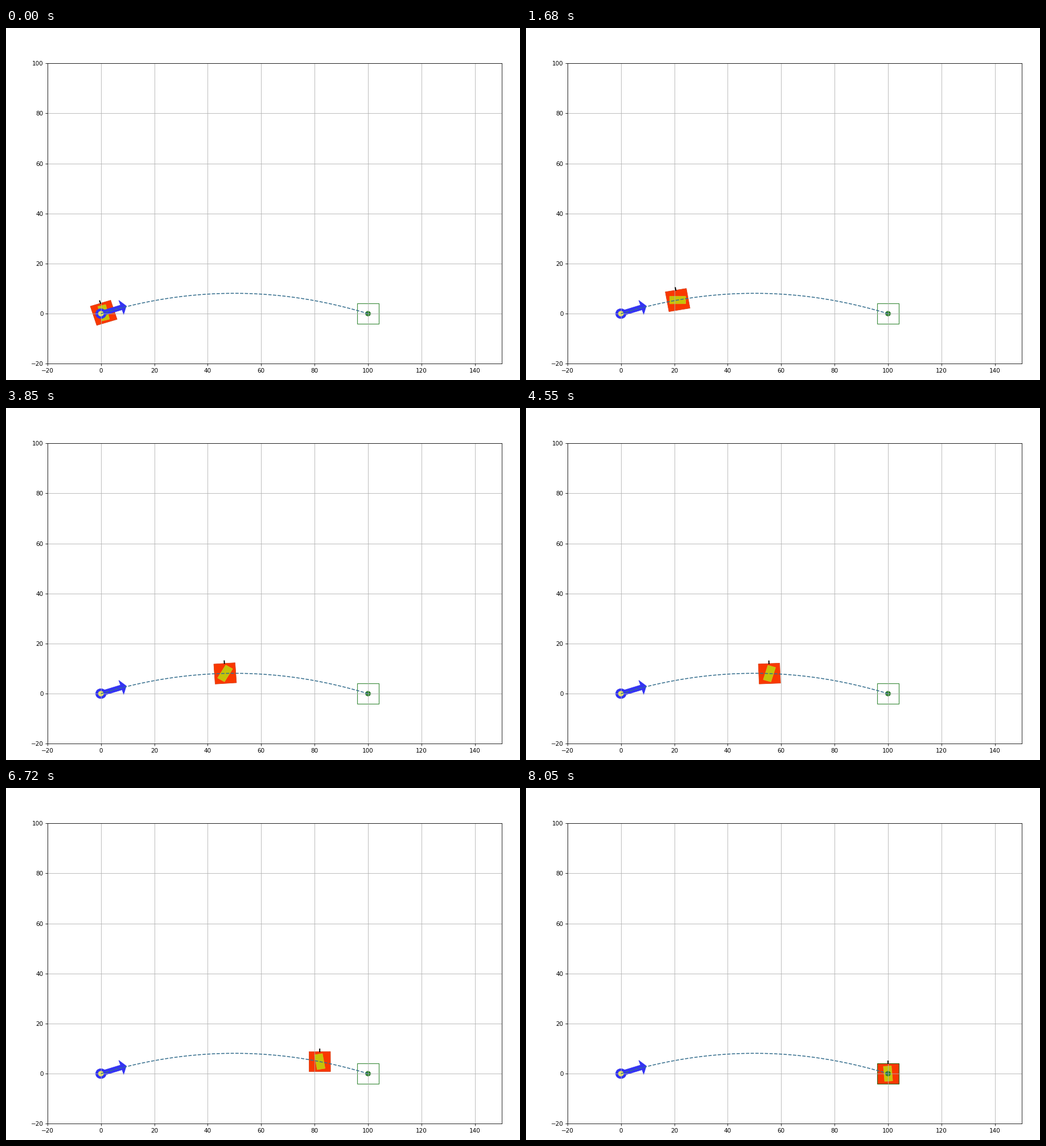
Animation, 903 px wide and 620 px high, one loop 8120 ms. Source, as a matplotlib script:

```python
import numpy as np
import matplotlib.pyplot as plt
from matplotlib.animation import FuncAnimation
from matplotlib.patches import Arrow, Circle, Rectangle

W, H, DPI = 903, 620, 72
FRAMES, INTERVAL = 116, 70
HEADING = 18
SLOPE = np.tan(np.radians(HEADING))

plt.rcParams.update({
    "font.family": "DejaVu Sans",
    "font.size": 10.42,
    "axes.linewidth": 0.83,
    "grid.linewidth": 0.83,
    "xtick.major.size": 3.65, "ytick.major.size": 3.65,
    "xtick.major.pad": 3.65, "ytick.major.pad": 3.65,
    "xtick.major.width": 0.83, "ytick.major.width": 0.83,
})

# Waypoints: frame index, distance travelled, gripper angle
KEYS = [0, 24, 45, 65, 82, 96, 115]
TRAVEL = [1.04, 21.24, 37.4, 55.6, 69.7, 81.95, 100]
SPIN = [14, 91, 132, 165, 180, 190, 184.6]
spin_fit = np.polyfit(np.array(KEYS) / 115, SPIN, 4)


def path(x):
    return SLOPE * x * (1 - x / 100)


def box(w, h, **style):
    return Rectangle((-w / 2, -h / 2), w, h, rotation_point="center", **style)


def place(rect, x, y, angle):
    rect.set_xy((x - rect.get_width() / 2, y - rect.get_height() / 2))
    rect.set_angle(angle)


fig = plt.figure(figsize=(W / DPI, H / DPI), dpi=DPI, facecolor="white")
ax = fig.add_axes([72.9 / W, 28.7 / H, 797.7 / W, 529.1 / H])
ax.set(xlim=(-20, 150), ylim=(-20, 100),
       xticks=range(-20, 141, 20), yticks=range(-20, 101, 20))
ax.grid(True, color="#b0b0b0")

body = box(8, 8, fc="#f93800", ec="#d8401a", lw=0.8)
gripper = box(3, 6, fc="#c5c308", ec="#d0c020", lw=0.8)
a = np.radians(HEADING)
patches = [
    body,
    gripper,
    Arrow(0, 0, 10 * np.cos(a), 10 * np.sin(a), width=10, fc="#3333f3", ec="#3333f3", lw=0.6),
    Circle((0, 0), 2, fc="#3333f3", ec="#3333f3", lw=0.6),
    Circle((0, 0), 1, fc="#eeee55", ec="#eeee55", lw=0.5),
    Rectangle((96, -4), 8, 8, fill=False, ec="#006a00", lw=1.2, alpha=0.75),
    Circle((100, 0), 1, fc="#2a802a", ec="#2a802a", lw=0.4),
]
for p in patches:
    ax.add_patch(p)

xs = np.linspace(0, 100, 201)
ax.plot(xs, path(xs), "--", color="#38708f", lw=1.56)
antenna, = ax.plot([], [], color="black", lw=1.9, solid_capstyle="projecting")


def update(i):
    u = i / (FRAMES - 1)
    x = np.interp(i, KEYS, TRAVEL)
    y = path(x)
    tilt = HEADING * max(0, 1 - x / 100) ** 2.5
    place(body, x, y, tilt)
    place(gripper, x, y, np.polyval(spin_fit, u))
    t = np.radians(tilt)
    r = np.array([4, 5])
    antenna.set_data(x - r * np.sin(t), y + r * np.cos(t))
    return body, gripper, antenna


anim = FuncAnimation(fig, update, frames=FRAMES, interval=INTERVAL,
                     repeat=True, repeat_delay=0, blit=False)
plt.show()
```
